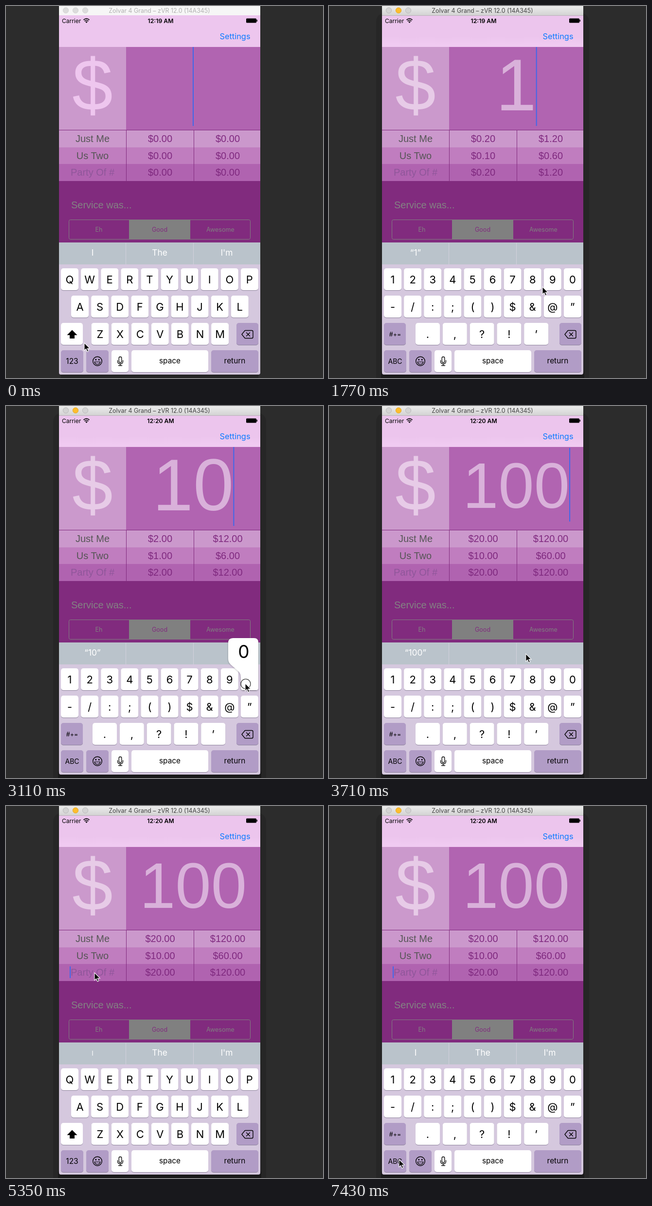
These frames come from a looping animation (652 by 763 pixels, 8 s). An HTML page:

```html
<!DOCTYPE html>
<html lang="en">
<head>
<meta charset="utf-8">
<title>Tip calculator</title>
<style>
html, body { margin: 0; width: 100%; height: 100%; overflow: hidden; background: #2c2c2c; }
svg { display: block; width: 652px; height: 763px; }
text { font-family: Inter, Roboto, sans-serif; white-space: pre; }
.h { font-family: "Liberation Sans", Arial, sans-serif; }
</style>
</head>
<body>
<svg id="stage" viewBox="0 0 652 763">
  <defs>
    <linearGradient id="bar" x2="0" y2="1"><stop stop-color="#ececec"/><stop offset="1" stop-color="#d2d2d2"/></linearGradient>
    <linearGradient id="nav" x2="0" y2="1"><stop offset=".65" stop-color="#ecc5ed"/><stop offset=".9" stop-color="#f0caf1"/></linearGradient>
    <filter id="soft" x="-20%" y="-20%" width="140%" height="140%"><feDropShadow dx="0" dy="1" stdDeviation="1.5" flood-opacity=".3"/></filter>
  </defs>
  <g id="view"></g>
</svg>
<script>
const LOOP = 8000, STEP = 149;
const PURPLE = '#812b7e', GREY = '#808080', MAUVE = '#b19cc6';
const view = document.getElementById('view');

const rect = (x, y, w, h, fill, more = '') =>
  `<rect x="${x}" y="${y}" width="${w}" height="${h}" fill="${fill}" ${more}/>`;
const text = (s, x, y, size, fill = '#000', more = 'text-anchor="middle"') =>
  `<text x="${x}" y="${y}" font-size="${size}" fill="${fill}" ${more}>${s.replace(/&/g, '&amp;')}</text>`;
const helv = (s, x, y, size, fill, anchor = 'middle') =>
  text(s, x, y, size, fill, `class="h" text-anchor="${anchor}"`);
const line = (d, width = 1.4, stroke = '#000') =>
  `<path d="${d}" fill="none" stroke="${stroke}" stroke-width="${width}" stroke-linecap="round" stroke-linejoin="round"/>`;
const shape = (d, fill = '#000') => `<path d="${d}" fill="${fill}"/>`;
const key = (x, y, w, fill = '#fff') =>
  rect(x, y + 1, w, 45, '#8f839d', 'rx="5"') + rect(x, y, w, 45, fill, 'rx="5"');

// Pointer path: step, x, y
const pointer = [
  [0, 161, 691], [2, 144, 720], [4, 141, 720], [7, 156, 574], [9, 134, 566], [10, 134, 566],
  [12, 439, 576], [13, 491, 575], [16, 492, 571], [21, 492, 569], [23, 490, 571],
  [30, 192, 352], [32, 174, 344], [34, 182, 342], [37, 182, 342], [43, 141, 716],
  [46, 144, 725], [54, 144, 725]
];
// Last entry whose step has been reached
const latest = (list, n) => list.filter(e => e[0] <= n).pop();
const bills = [[0, '', 0], [10, '1', 1470], [14, '10', 2080], [22, '100', 3260]];
const boards = [[0, 'abc'], [4, 'num'], [36, 'abc'], [47, 'num']];
const touches = [3, 9, 13, 20, 21, 33, 46];
const popups = { 9: '1', 13: '0', 20: '0', 21: '0' };

function pointerAt(n) {
  const i = Math.max(1, pointer.findIndex(p => p[0] > n));
  const [a, ax, ay] = pointer[i - 1], [b, bx, by] = pointer[i];
  const f = (n - a) / (b - a);
  return [ax + (bx - ax) * f, ay + (by - ay) * f];
}

function frameWindow(active) {
  const light = (x, fill, edge) => `<circle cx="${x}" cy="9" r="5.7" fill="${fill}" stroke="${edge}" stroke-width=".8"/>`;
  const off = active ? ['#d3d3d3', '#b3b3b3'] : ['#dcdcdc', '#cecece'];
  return (active ? rect(97, 14, 438, 770, '#262626', 'rx="18"') + rect(107, 750, 418, 20, '#191919')
                 : rect(113, 750, 406, 20, '#242424')) +
    rect(109, 0, 414, 20, active ? 'url(#bar)' : '#f6f6f6') +
    (active ? rect(109, 19, 414, 1, '#b8b0b8') : '') +
    light(123, ...off) +
    light(143, ...(active ? ['#fdbd2e', '#dfa023'] : off)) +
    light(163, ...off) +
    text('Zolvar 4 Grand – zVR 12.0 (14A345)', 315.5, 14, 12.4, active ? '#444' : '#b1b1b1');
}

function header(active, clock) {
  return rect(109, active ? 20 : 19, 414, 65, active ? 'url(#nav)' : '#edc6ee') +
    text('Carrier', 115, 35, 12, '#000', '') +
    line('M160 28.2Q165.5 23.6 171 28.2M162 30.7Q165.5 27.8 169 30.7', 1.6) +
    shape('M163.2 32.3Q165.5 30.7 167.8 32.3L165.5 35z') +
    text(clock, 318, 35, 12.2, '#000', 'text-anchor="middle" font-weight="600"') +
    rect(494, 25.5, 21, 9, '#000', 'rx="1.5"') + rect(515.5, 28, 1.5, 4, '#000') +
    text('Settings', 471, 68, 16.4, '#0c7bff');
}

function bill(value, active, caret) {
  const size = value.length > 2 ? 132 : 150;
  const end = 385 + value.length * size * .278;
  return rect(109, 84, 138, 170, '#cb99cc') + rect(247, 84, 276, 170, '#b164b1') +
    helv('$', 178, 214, 150, active ? '#e7cbe7' : '#eec6ee') +
    helv(value, 385, value.length > 2 ? 208.5 : 214, size, '#d9b1da') +
    (caret ? rect(end - 1, size < 150 ? 86 : 84, 2, size < 150 ? 151 : 162, '#3f68ea') : '');
}

function table(value, caret) {
  const money = v => '$' + v.toFixed(2);
  const rows = [['Just Me', 1, '#cb98cc', '#555'], ['Us Two', 2, '#c07dbf', '#555'], ['Party Of #', 1, '#b063b0', '#8f569a']];
  const edges = [255, 290, 324, 359];
  return rows.map(([name, people, fill, ink], i) => {
    const y = [279, 314, 348][i];
    return rect(109, edges[i], 414, edges[i + 1] - edges[i], fill) +
      helv(name, 178, y, 20, ink) +
      helv(money(value * .2 / people), 317, y, 20, '#7f297f') +
      helv(money(value * 1.2 / people), 456, y, 20, '#7f297f');
  }).join('') +
    rect(109, 254, 414, 1, PURPLE) + rect(247, 254, 1, 105, PURPLE) + rect(386, 254, 1, 105, PURPLE) +
    (caret ? rect(131, 329, 2, 24, '#3f68ea') : '');
}

function service() {
  return rect(109, 359, 414, 126, PURPLE) +
    helv('Service was...', 134, 415, 20, '#838383', 'start') +
    rect(129.5, 438.5, 373, 40, 'none', `rx="3" stroke="${GREY}"`) + rect(253, 438, 126, 41, GREY) +
    text('Eh', 191, 463, 12.6, GREY) + text('Good', 316, 463, 12.6, PURPLE) + text('Awesome', 441, 463, 12.6, GREY);
}

function suggestions(words, entering) {
  return rect(109, 485, 414, 45, '#bac3cb') +
    rect(246, 486, 1, 44, '#d2d1dc') + rect(385, 486, 1, 44, '#d2d1dc') +
    words.map((w, i) => text(w, 178 + 138 * i, 512, entering && !i ? 13 : 17.4, '#fff')).join('');
}

function keyRow(chars, x, y, width = 36, step = 41.1) {
  return [...chars].map((c, i) => {
    const left = x + i * step;
    return key(left, y, width) + text(c, left + width / 2, y + 31, 22);
  }).join('');
}

function icons() {
  return line('M491.5 665.5H505.5Q508 665.5 508 668V679Q508 681.5 505.5 681.5H491.5L485 673.5z') +
    line('M494.5 670L501.5 677M501.5 670L494.5 677') +
    '<circle cx="188" cy="728.5" r="9.3" fill="none" stroke="#000" stroke-width="1.4"/>' +
    '<circle cx="184.8" cy="725.5" r="1.4"/><circle cx="191.2" cy="725.5" r="1.4"/>' +
    line('M182 730H194Q192.5 735 188 735T182 730z', 1.2) +
    rect(232.2, 719.5, 5.6, 12, 'none', 'rx="2.8" stroke="#000" stroke-width="1.3"') +
    line('M229.5 727V729Q229.5 734 235 734T240.5 729V727M235 734V737.5M231.5 737.5H238.5', 1.3);
}

function keyboard(board) {
  const abc = board === 'abc';
  return shape('M109 530H523V752Q523 756 519 756H113Q109 756 109 752z', '#d5c8de') +
    (abc
      ? keyRow('QWERTYUIOP', 113, 538) + keyRow('ASDFGHJKL', 134, 594) + keyRow('ZXCVBNM', 175.5, 650) +
        key(113, 650, 45) + shape('M136 664.5L146.5 675H141V682H131V675H125.5z')
      : keyRow('1234567890', 113, 538) + keyRow('-/:;()$&@”', 113, 594) + keyRow('.,?!’', 178, 650, 50, 55.8) +
        key(113, 650, 45, MAUVE) + text('#+=', 136, 678, 12.5)) +
    key(474, 650, 45, MAUVE) + key(113, 706, 46, MAUVE) + key(165, 706, 46, MAUVE) +
    key(217, 706, 35) + key(258, 706, 158) + key(422, 706, 97, MAUVE) +
    text(abc ? '123' : 'ABC', 136, 734, abc ? 15.5 : 14) +
    text('space', 337, 733, 15.4) + text('return', 470.5, 733, 15.4) + icons();
}

function popup(digit) {
  const left = digit === '1';
  return `<path filter="url(#soft)" fill="#fff" ${left ? 'transform="matrix(-1 0 0 1 632 0)"' : ''}
    d="M467 476H510Q519 476 519 485V578Q519 583 514 583H488Q483 583 483 578V556Q483 549 478 544L462 530Q457 525 457 518V486Q457 476 467 476z"/>` +
    text(digit, left ? 143 : 489, 517, 37);
}

function arrow(x, y, pressed) {
  return (pressed ? `<circle cx="${x + 1}" cy="${y + 1}" r="10" fill="#fff" fill-opacity=".3" stroke="#222" stroke-width="1.2"/>` : '') +
    `<path transform="translate(${x} ${y})" d="M0 0V15.5L3.6 12.2L6.1 18L8.7 16.9L6.2 11.2H11.2z" stroke="#fff" stroke-width="1.1"/>`;
}

function render(n, time) {
  const active = n >= 3;
  const [, value, typed] = latest(bills, n);
  const board = latest(boards, n)[1];
  const party = n >= 36;
  const blink = since => (time - since + 30) % 1000 < 600;
  const words = value && !party ? [`“${value}”`] : ['I', 'The', "I'm"];
  const [x, y] = pointerAt(n);
  view.innerHTML =
    frameWindow(active) + header(active, n < 15 ? '12:19 AM' : '12:20 AM') +
    bill(value, active, n < 34 && blink(typed)) + table(+value, party && blink(5350)) +
    service() + suggestions(words, n === 36) + keyboard(board) +
    (popups[n] ? popup(popups[n]) : '') + arrow(x, y, touches.includes(n));
}

let shown = -1;
function tick() {
  const n = Math.floor((performance.now() % LOOP + 25) / STEP);
  if (n !== shown) render(shown = n, Math.max(0, n * STEP - 25));
  requestAnimationFrame(tick);
}
tick();
</script>
</body>
</html>
```
